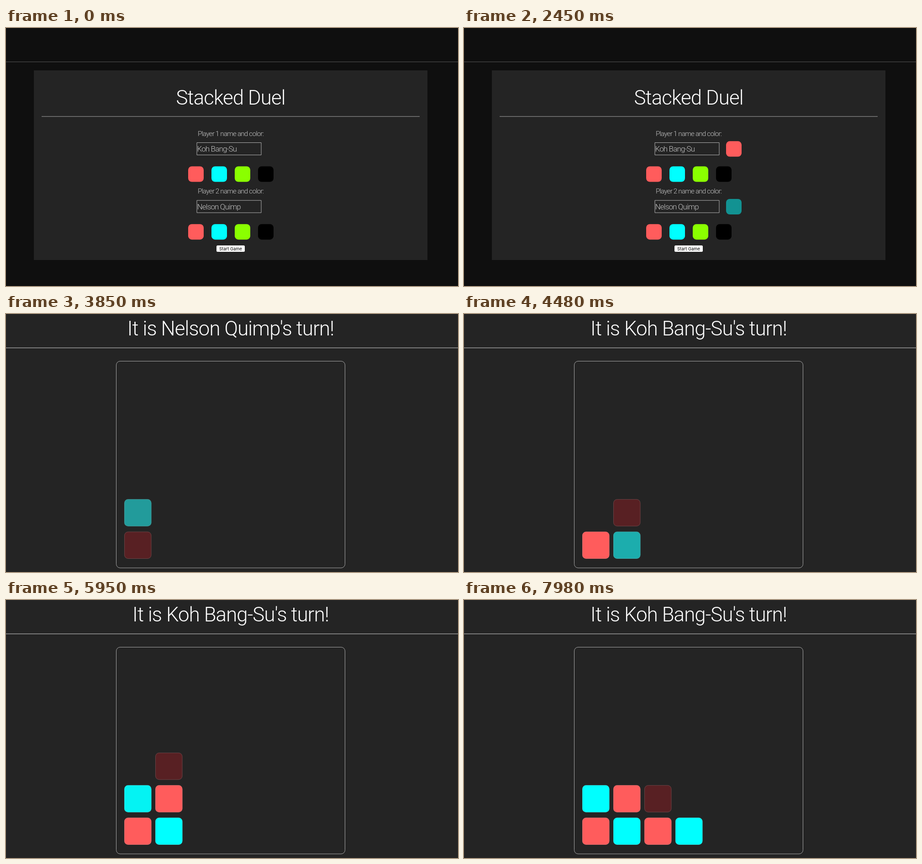
An HTML page with a canvas that plays this animation: 990x566 px, repeating every 8 s.

```html
<!DOCTYPE html>
<html lang="en">
<head>
<meta charset="utf-8">
<title>Stacked Duel</title>
<style>
html, body { margin: 0; width: 100%; height: 100%; overflow: hidden; background: #242424; }
canvas { display: block; width: 990px; height: 566px; }
</style>
</head>
<body>
<canvas id="stage" width="990" height="566"></canvas>
<script>
const ctx = document.getElementById('stage').getContext('2d');
const LOOP = 8000, MID = 492, PAGE = '#242424', FONT = 'Roboto, sans-serif';
const RED = [255, 92, 92], CYAN = [0, 255, 255];
const CHOICES = [RED, CYAN, [138, 255, 0], [0, 0, 0]];

// "hover" is the preview colour under the pointer
const players = [
  { name: 'Koh Bang-Su', color: RED, hover: [88, 32, 35], pickAt: 1400 },
  { name: 'Nelson Quimp', color: CYAN, hover: [34, 155, 155], pickAt: 2310 }
];

const START = 2940, CLOSE = 350, PICK = 280, SETTLE = 400;

// Placed tiles: player, column, row from the bottom, time
const moves = [
  { who: 0, col: 0, row: 0, at: 3850 },
  { who: 1, col: 1, row: 0, at: 4410 },
  { who: 0, col: 1, row: 1, at: 4890 },
  { who: 1, col: 0, row: 1, at: 5600 },
  { who: 0, col: 2, row: 0, at: 6495 },
  { who: 1, col: 3, row: 0, at: 7350 }
];

// Column under the pointer from each time on; -1 is none
const pointer = [
  [3430, 0], [4130, 1], [5250, 0], [5880, 1], [6160, 2],
  [6660, -1], [6860, 3], [7770, 2]
];

const ramp = (t, from, span) => Math.min(1, Math.max(0, (t - from) / span));
const mix = (a, b, k) => a.map((v, i) => v + (b[i] - v) * k);
const rgb = c => `rgb(${c.map(Math.round).join(',')})`;

function text(str, x, y, font, color, spacing, align) {
  ctx.font = font;
  ctx.fillStyle = color;
  ctx.letterSpacing = spacing + 'px';
  ctx.textAlign = align || 'center';
  ctx.fillText(str, x, y);
}

const heading = (str, y) => text(str, MID, y, '300 43.7px ' + FONT, '#fff', -0.85);

function box(x, y, w, h, r) {
  ctx.beginPath();
  ctx.roundRect(x, y, w, h, r);
}

function outline(x, y, w, h, r, color) {
  box(x, y, w, h, r);
  ctx.strokeStyle = color;
  ctx.lineWidth = 1;
  ctx.stroke();
}

function tile(x, y, size, r, color) {
  box(x, y, size, size, r);
  ctx.fillStyle = rgb(color);
  ctx.fill();
}

function rule(x, y, w, h, color) {
  ctx.fillStyle = color;
  ctx.fillRect(x, y, w, h);
}

function cell(col, row, color) {
  const x = 259 + col * 68, y = 477.5 - row * 71.3;
  tile(x, y, 59.5, 8.5, color);
  outline(x + 0.5, y + 0.5, 58.5, 58.5, 8, 'rgba(150,150,150,0.3)');
}

function drawBoard(t) {
  const done = moves.filter(m => t >= m.at);
  const player = players[done.length % 2];
  heading(`It is ${player.name}'s turn!`, 46.7);
  outline(241.5, 103.5, 501, 453.5, 8.5, '#a8a8a8');

  for (const m of done) {
    const p = players[m.who];
    cell(m.col, m.row, mix(p.hover, p.color, ramp(t, m.at, SETTLE)));
  }
  const spot = pointer.filter(p => t >= p[0]).pop();
  if (spot && spot[1] >= 0) {
    const row = done.filter(m => m.col === spot[1]).length;
    cell(spot[1], row, player.hover);
  }
}

function drawPlayerForm(t, player, index) {
  const y = index * 126.7;
  text(`Player ${index + 1} name and color:`, MID, 236.5 + y, '300 15.3px ' + FONT, '#c4c4c4', -0.85);
  outline(418, 251.5 + y, 141, 27, 0, '#b4b4b4');
  text(player.name, 418.5, 271 + y, '300 17px ' + FONT, '#c4c4c4', -0.85, 'left');
  const shown = ramp(t, player.pickAt, PICK);
  if (shown) tile(574, 248.3 + y, 34, 8, mix([36, 36, 36], player.color, shown));
  CHOICES.forEach((c, i) => tile(399 + i * 51, 303.5 + y, 34, 8, c));
}

function drawDialog(t) {
  ctx.save();
  ctx.globalAlpha = 1 - ramp(t, START, CLOSE);
  ctx.fillStyle = 'rgba(0,0,0,0.58)';
  ctx.fillRect(0, 0, 990, 566);
  ctx.fillStyle = PAGE;
  ctx.fillRect(61, 93, 862, 416);
  heading('Stacked Duel', 168);
  rule(78, 193.6, 828, 1, '#a8a8a8');
  players.forEach((p, i) => drawPlayerForm(t, p, i));
  box(461, 477, 62, 14, 2.5);
  ctx.fillStyle = '#fff';
  ctx.fill();
  text('Start Game', MID, 487.7, '9.3px Inter, sans-serif', '#000', 0.05);
  ctx.restore();
}

function draw(t) {
  ctx.fillStyle = PAGE;
  ctx.fillRect(0, 0, 990, 566);
  rule(0, 73.7, 990, 1.2, '#b4b4b4');
  if (t >= START) drawBoard(t);
  if (t < START + CLOSE) drawDialog(t);
}

const begin = performance.now();
function tick() {
  draw((performance.now() - begin) % LOOP);
  requestAnimationFrame(tick);
}
tick();
</script>
</body>
</html>
```
